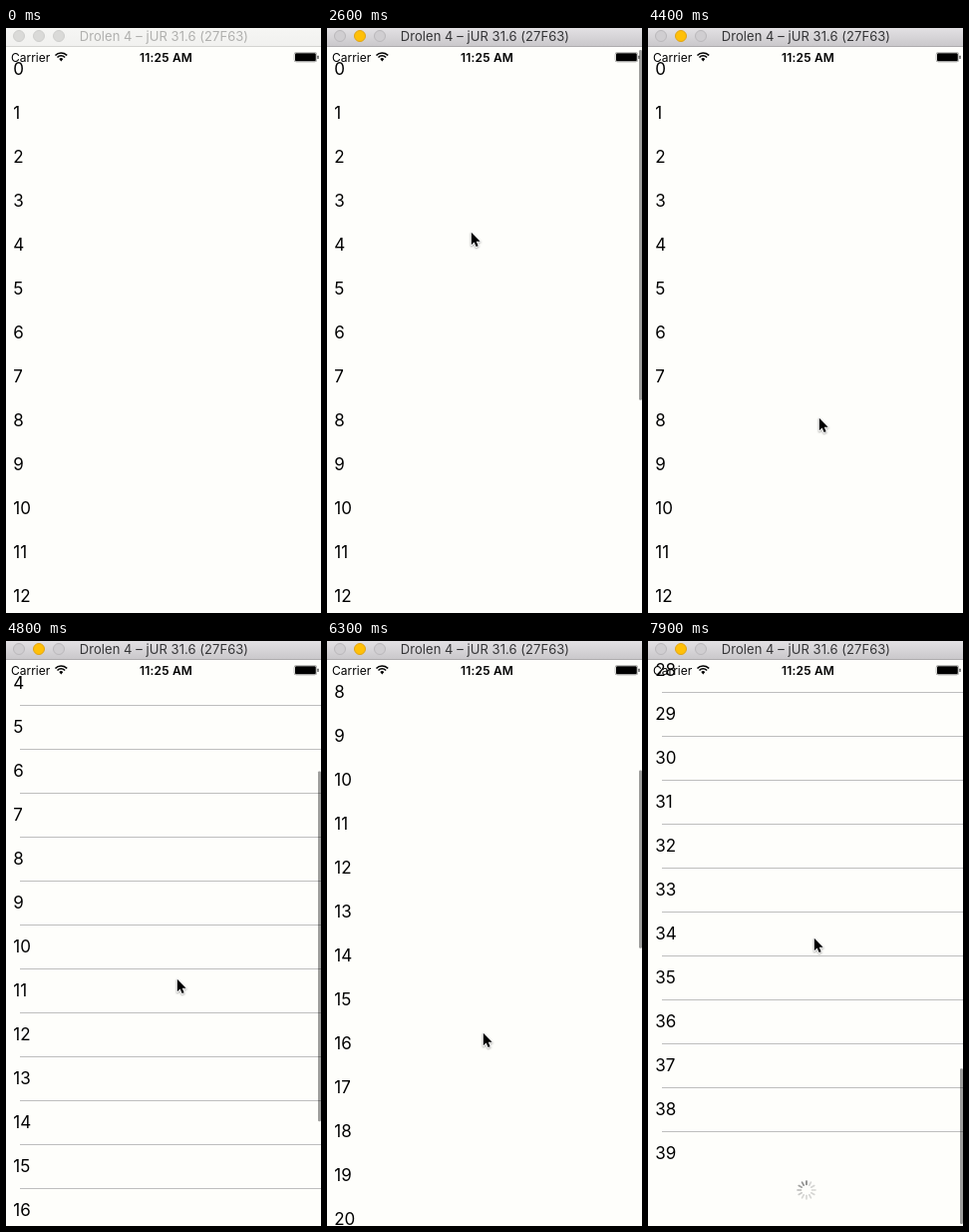
An HTML page with a canvas that plays this animation: 316x586 px, repeating every 8000 ms.

```html
<!DOCTYPE html>
<html lang="en">
<head>
<meta charset="utf-8">
<title>Endless list</title>
<style>
  html, body { margin: 0; width: 100%; height: 100%; overflow: hidden; background: #fefefb; }
  canvas { display: block; width: 316px; height: 586px; }
</style>
</head>
<body>
<canvas id="stage"></canvas>
<script>
const W = 316, H = 586, LOOP = 8000, STEP = 100;
const BAR = 18, ROW = 44, FOOTER = 30, VIEW = 568;
const ENTER = 1200, ACTIVATE = 1700, LOADED = 6300;

const canvas = document.getElementById('stage');
const ratio = window.devicePixelRatio || 1;
canvas.width = W * ratio;
canvas.height = H * ratio;
const ctx = canvas.getContext('2d');
ctx.scale(ratio, ratio);

const progress = (t, start, duration) => Math.min(1, Math.max(0, (t - start) / duration));

function ease(t, start, duration) {
  const p = progress(t, start, duration);
  return p * p * (3 - 2 * p);
}

// Three flicks; the first overshoots the end and springs back.
function scrollAt(t) {
  const flick = (start, distance) => distance * ease(t, start, 800);
  const offset = flick(4400, 351) - 9 * ease(t, 5300, 400) + flick(6300, 355) + flick(7100, 547.5);
  return Math.round(offset * 2) / 2;
}

function thumbOpacity(t) {
  const pulse = (on, off) => progress(t, on, 100) - progress(t, off, 900);
  return pulse(2400, 3000) * (t < 3700) + pulse(4400, 5300) + progress(t, 6200, 100) * (1 - pulse(4400, 5300));
}

function cursorAt(t) {
  const glide = start => ease(t, start, 500);
  const enter = glide(ENTER), nudge = glide(2500), down = glide(3700);
  const drag = glide(4500), back = glide(5800), pull = glide(7100);
  return [
    310 - 166 * enter + nudge + 26 * down - 15 * back + 10 * pull,
    300 - 96 * enter + 186 * down - 81 * drag + 83 * back - 95 * pull
  ].map(Math.round);
}

function text(str, x, baseline, font, color, spacing = 0, align = 'left') {
  ctx.font = font + ' Inter, Roboto, sans-serif';
  ctx.letterSpacing = spacing + 'px';
  ctx.textAlign = align;
  ctx.fillStyle = color;
  ctx.fillText(str, x, baseline);
}

function rect(x, y, w, h, color) {
  ctx.fillStyle = color;
  ctx.fillRect(x, y, w, h);
}

function pill(x, y, w, h, r, color) {
  ctx.beginPath();
  ctx.roundRect(x, y, w, h, r);
  ctx.fillStyle = color;
  ctx.fill();
}

function drawTitleBar(active) {
  const shade = ctx.createLinearGradient(0, 0, 0, BAR);
  shade.addColorStop(0, active ? '#e3e1e4' : '#f6f6f4');
  shade.addColorStop(1, active ? '#cac8cb' : '#f1f1ef');
  rect(0, 0, W, BAR, shade);
  rect(0, BAR, W, 1, active ? '#aeacae' : '#d4d4d1');
  for (let i = 0; i < 3; i++) {
    const lit = active && i === 1;
    ctx.beginPath();
    ctx.arc(13 + 20 * i, 8, 5.5, 0, 7);
    ctx.fillStyle = lit ? '#ffc008' : active ? '#d0ced1' : '#dadad8';
    ctx.fill();
    ctx.strokeStyle = lit ? '#e0a416' : active ? '#bab8bb' : '#cfcfcd';
    ctx.lineWidth = 1;
    ctx.stroke();
  }
  text('Drolen 4 – jUR 31.6 (27F63)', 158.5, 13, '13px', active ? '#343436' : '#b0b0ae', .05, 'center');
}

function drawStatusBar() {
  text('Carrier', 5, 33.5, '12px', '#000');
  text('11:25 AM', 160.5, 33.5, '600 12px', '#000', .2, 'center');

  ctx.strokeStyle = '#000';
  ctx.lineWidth = 1.6;
  for (const r of [8, 5.2]) {
    ctx.beginPath();
    ctx.arc(55.3, 33, r, -Math.PI * .76, -Math.PI * .24);
    ctx.stroke();
  }
  ctx.beginPath();
  ctx.moveTo(55.3, 33.6);
  ctx.arc(55.3, 33, 2.8, -Math.PI * .76, -Math.PI * .24);
  ctx.fillStyle = '#000';
  ctx.fill();

  pill(288.8, 24.3, 23.2, 10, 2.4, '#8a8a88');
  pill(289.3, 24.8, 22.2, 9, 2, '#fefefb');
  pill(290, 25.3, 20.8, 8, 1.2, '#000');
  pill(312.3, 27.5, 1.4, 3.6, .7, '#555');
}

function drawSpinner(x, y, t) {
  const head = Math.floor(t % 1000 / 1000 * 12) + 2;
  ctx.lineWidth = 1.6;
  ctx.lineCap = 'round';
  for (let i = 0; i < 12; i++) {
    const age = (head - i + 12) % 12;
    const a = i * Math.PI / 6 - Math.PI / 2;
    ctx.strokeStyle = `rgba(90,90,90,${Math.max(.25, .8 - age * .12)})`;
    ctx.beginPath();
    ctx.moveTo(x + 5.5 * Math.cos(a), y + 5.5 * Math.sin(a));
    ctx.lineTo(x + 9 * Math.cos(a), y + 9 * Math.sin(a));
    ctx.stroke();
  }
  ctx.lineCap = 'butt';
}

function drawList(t, scroll, count) {
  // Half-point hairlines only land on a visible pixel at half offsets.
  const hairlines = scroll % 1 !== 0;
  for (let i = 0; i < count; i++) {
    const middle = Math.round(41 + i * ROW - scroll);
    if (middle < 0 || middle > H + 30) continue;
    text(String(i), 7.3, middle + 6, '17px', '#000', -.05);
    if (hairlines && i < count - 1) rect(14, middle + 22, W - 14, 1, '#bebebe');
  }
  const end = 19 + count * ROW - scroll;
  if (end < H) drawSpinner(159, Math.round(end + FOOTER / 2), t);
}

function drawThumb(scroll, count, opacity) {
  const track = 562, content = count * ROW + FOOTER;
  const over = Math.max(0, scroll - (content - VIEW));
  const top = 22 + (scroll - over) / content * track + over;
  const length = track * VIEW / content - over;
  pill(313, top, 3, length, 1.2, `rgba(0,0,0,${.38 * opacity})`);
}

function drawCursor(x, y) {
  ctx.save();
  ctx.translate(x + .8, y + .8);
  ctx.scale(.86, .86);
  const arrow = new Path2D('M0 0V14.5L3.3 11.3L5.6 16.6L8 15.6L5.8 10.4H10.3Z');
  ctx.lineJoin = 'round';
  ctx.lineWidth = 2;
  ctx.strokeStyle = '#fff';
  ctx.shadowColor = 'rgba(0,0,0,.35)';
  ctx.shadowBlur = 2 * ratio;
  ctx.shadowOffsetY = ratio;
  ctx.stroke(arrow);
  ctx.shadowColor = 'transparent';
  ctx.fillStyle = '#000';
  ctx.fill(arrow);
  ctx.restore();
}

function draw(now) {
  const t = Math.floor(now % LOOP / STEP) * STEP;
  const count = t < LOADED ? 20 : 40;
  const scroll = scrollAt(t);

  rect(0, 0, W, H, '#fefefb');
  drawList(t, scroll, count);
  drawThumb(scroll, count, thumbOpacity(t));
  drawStatusBar();
  drawTitleBar(t >= ACTIVATE);
  if (t >= ENTER) drawCursor(...cursorAt(t));
}

const start = performance.now();
function tick() {
  draw(performance.now() - start);
  requestAnimationFrame(tick);
}
tick();
</script>
</body>
</html>
```
